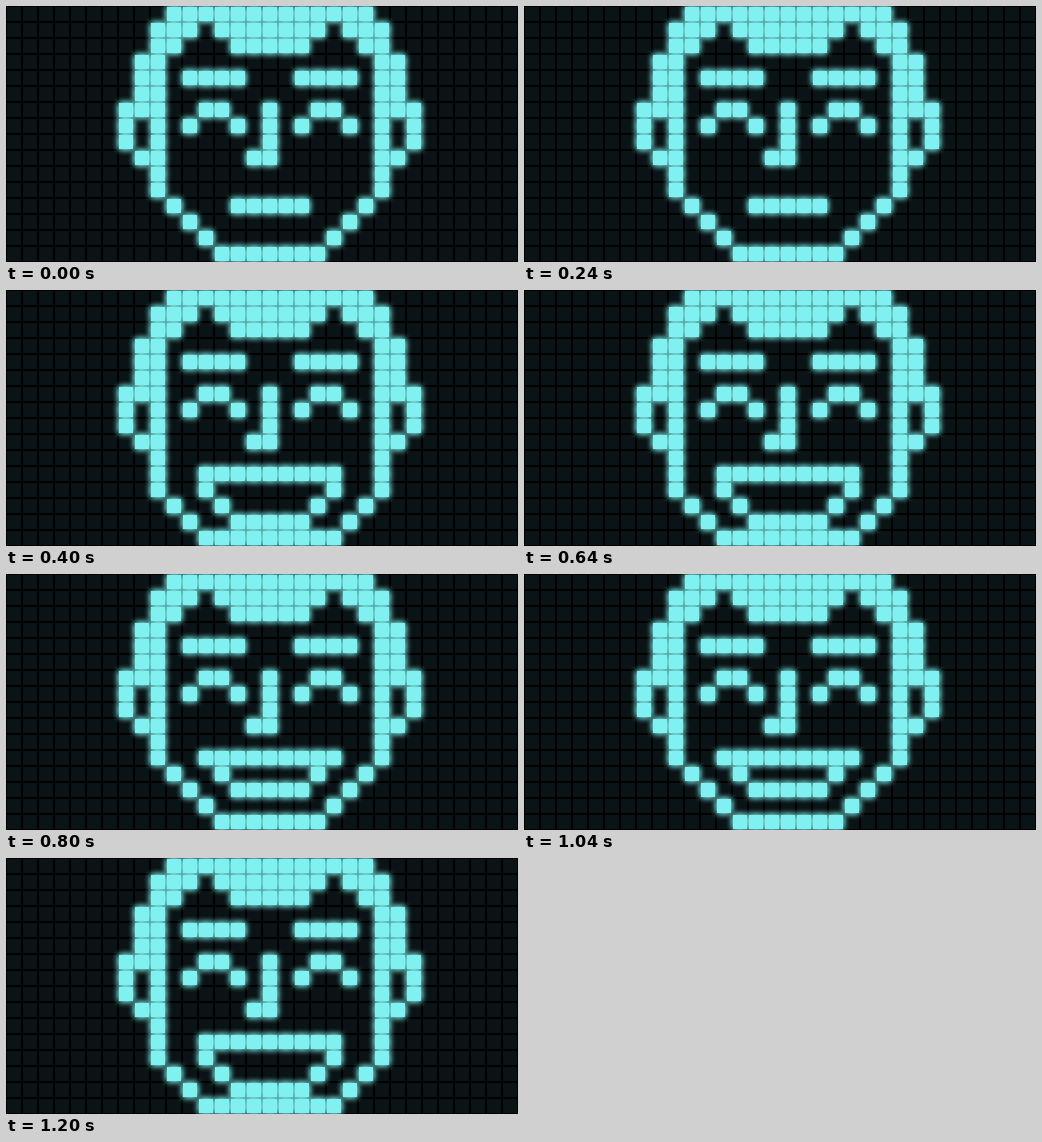
These frames come from a looping animation (512 by 256 pixels, 1600 ms). An HTML page with a canvas:

```html
<!DOCTYPE html>
<html lang="en">
<head>
<meta charset="utf-8">
<title>LED face</title>
<style>
  html, body { margin: 0; width: 100%; height: 100%; overflow: hidden; background: #000; }
  canvas { display: block; }
</style>
</head>
<body>
<canvas id="stage" width="512" height="256"></canvas>
<script>
const ctx = document.getElementById('stage').getContext('2d');
const CELL = 16, COLS = 32, ROWS = 16, CENTER = 16;
const STEP = 400;
const LIT = '#80f0f0', UNLIT = '#0a1416';
const GLOW_BLUR = 6, GLOW_PASSES = 2;
const MOUTH_CYCLE = [0, 2, 1, 2];

// Collects lit cells; d is the distance from the center column, mirrored to both sides.
function buildFace(opening) {
  const cells = new Set();
  const plot = (x, y) => cells.add(y * COLS + x);
  const pair = (d, y) => { plot(CENTER + d, y); plot(CENTER - d, y); };
  const bar = (from, to, y) => { for (let d = from; d <= to; d++) pair(d, y); };
  const column = (d, top, bottom) => { for (let y = top; y <= bottom; y++) pair(d, y); };

  const drop = opening > 1 ? 1 : 0;
  drawHair(pair);
  drawEars(pair, column);
  drawJaw(drop, pair, bar, column);
  drawEyes(pair, bar);
  column(0, 6, 9);
  plot(CENTER - 1, 9);
  drawMouth(opening, pair, bar);
  return cells;
}

// The hairline has a V-shaped notch around d = 4 that widens downwards.
function drawHair(pair) {
  for (let y = 0; y < 3; y++) {
    const edge = Math.min(7, 6 + y);
    for (let d = 0; d <= edge; d++) {
      if (Math.abs(d - 4) >= y) pair(d, y);
    }
  }
}

function drawEars(pair, column) {
  column(8, 3, 6);
  column(9, 6, 8);
  pair(8, 9);
}

function drawJaw(drop, pair, bar, column) {
  const chin = 3 + drop;
  column(7, 3, 11 + drop);
  for (let d = 6; d > chin; d--) pair(d, 18 + drop - d);
  bar(0, chin, ROWS - 1);
}

function drawEyes(pair, bar) {
  bar(2, 5, 4);
  for (let d = 2; d <= 5; d++) pair(d, Math.abs(d - 3.5) < 1 ? 6 : 7);
}

function drawMouth(opening, pair, bar) {
  const lowerLip = 12 + opening;
  if (opening) bar(0, 4, 11);
  for (let i = 1; i <= opening; i++) pair(2 + i, lowerLip - i);
  bar(0, 2, lowerLip);
}

function fillCell(index) {
  const x = index % COLS, y = Math.floor(index / COLS);
  ctx.fillRect(x * CELL + 1, y * CELL + 1, CELL - 2, CELL - 2);
}

function render(opening) {
  ctx.fillStyle = '#000';
  ctx.fillRect(0, 0, COLS * CELL, ROWS * CELL);

  ctx.fillStyle = UNLIT;
  for (let i = 0; i < COLS * ROWS; i++) fillCell(i);

  const cells = buildFace(opening);
  ctx.fillStyle = ctx.shadowColor = LIT;
  ctx.shadowBlur = GLOW_BLUR;
  for (let pass = 0; pass < GLOW_PASSES; pass++) cells.forEach(fillCell);
  ctx.shadowBlur = 0;
}

let shown = -1;

function tick() {
  const step = Math.floor(performance.now() / STEP) % MOUTH_CYCLE.length;
  if (step !== shown) {
    shown = step;
    render(MOUTH_CYCLE[step]);
  }
  requestAnimationFrame(tick);
}

tick();
</script>
</body>
</html>
```
